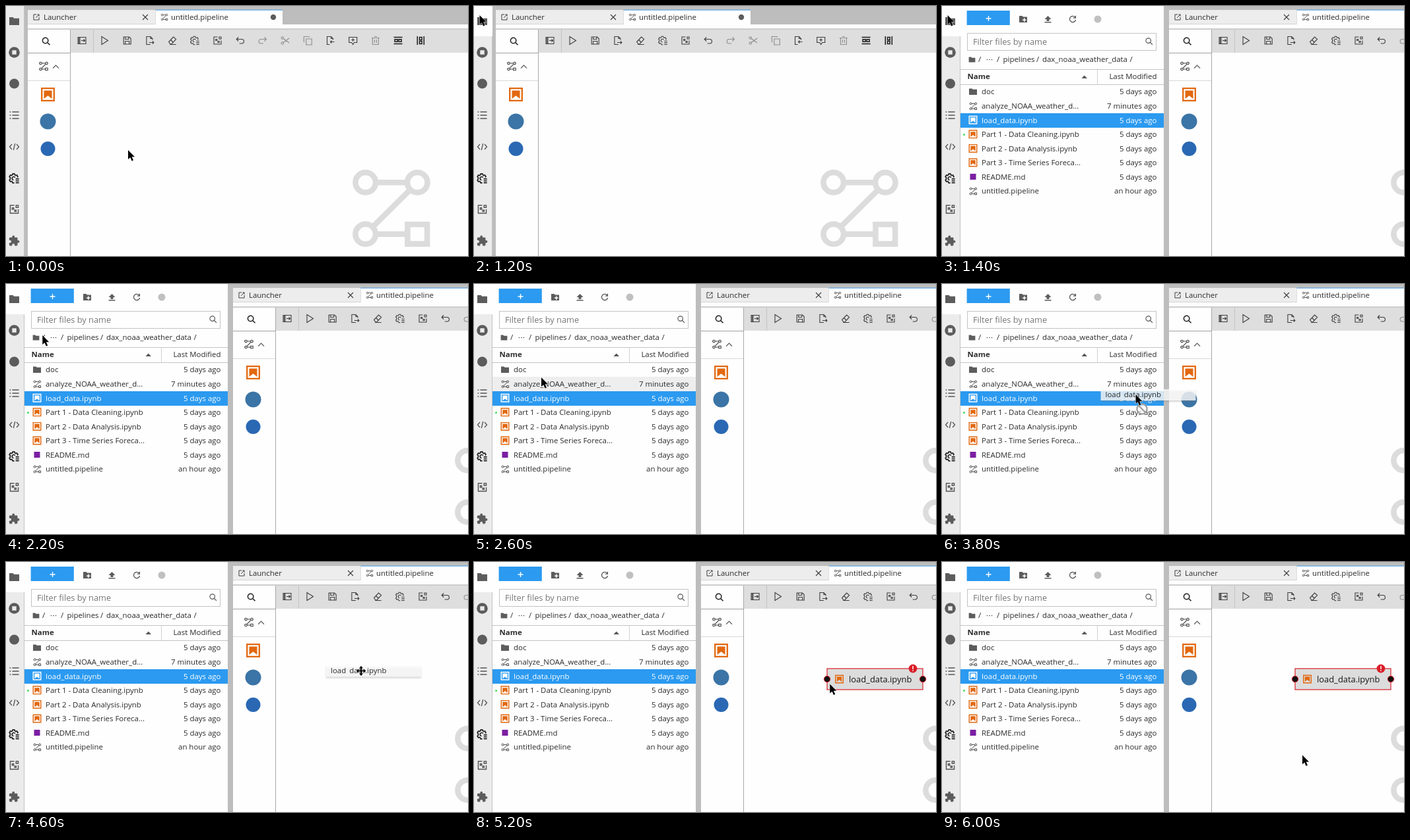
Recreate the animation shown at these times as an HTML page. Size 700 by 380 pixels, loop 6200 ms.

```html
<!DOCTYPE html>
<html lang="en">
<head>
<meta charset="utf-8">
<title>Pipeline editor drag and drop</title>
<style>
  html, body { margin: 0; width: 100%; height: 100%; overflow: hidden; background: #fff; }
  svg { display: block; width: 700px; height: 380px; }
  text { font: 11.45px "Open Sans", "Noto Sans", sans-serif; fill: #2b2b2b; }
  .end { text-anchor: end; }
  .bold { font-weight: 700; }
  .icon { fill: none; stroke: #3d3d3d; stroke-width: 1.1; }
  .dim { stroke: #8d8d8d; }
  .solid { fill: #5c5c5c; stroke: none; }
  .heavy { stroke: #1c1c1c; stroke-width: 1.5; }
  .side { stroke: #555; stroke-width: 1.3; }
  .mark { stroke: #dcdcdc; stroke-width: .98; }
  .pointer { fill: #000; stroke: #fff; stroke-width: 1; paint-order: stroke; }
</style>
</head>
<body>
<svg id="stage" viewBox="0 0 700 380"></svg>
<script>
const STEP = 200, LOOP = 6200;
const OPEN = 1400, DRAG = 3400, DROP = 5000;

const shapes = {
  panel: 'M-6-5H6V5H-6ZM-3-5V5M-4.5-5V5M-1 0H4.5M2.5-2L4.5 0 2.5 2',
  play: 'M-4.5-6V6L5 0Z',
  save: 'M-5.5-5.5H3L5.5-3V5.5H-5.5ZM-3-5.5V-2H2V-5.5M-3 5.5V1H3V5.5',
  export: 'M1 6H-5V-6H1L4-3V-1M1-6V-3H4M-1 3H6M4 1L6 3 4 5',
  eraser: 'M-5.5 2L1.5-5.5 5.5-2-1.5 5.5H-3ZM-2.5-1L1.5 3M-4 6H5.5',
  gear: 'M4-1.3L5-2.4 3.7-4.6 2-4.1.8-4.8.4-6.2H-2.2L-2.6-4.8-3.8-4.1-5.4-4.6-6.7-2.4-5.6-1.2V1.2L-6.7 2.4-5.4 4.6-3.8 4.1-2.6 4.8-2.2 6.2H0M1.2-1.2A2.3 2.3 0 1 0-1 2.3M2 .8H6.5M2 3.4H6.5M2 6H6.5',
  runtime: 'M0-5.5H-5.5V5.5H5.5V0M2.5-5.5H5.5V-2.5H2.5ZM-2.8-2H-.8V0H-2.8ZM.6 1H2.6V3H.6Z',
  undo: 'M-2.5-5L-5.5-2-2.5 1M-5.5-2H2.5A3.2 3.2 0 0 1 2.5 4.5H-1',
  redo: 'M2.5-5L5.5-2 2.5 1M5.5-2H-2.5A3.2 3.2 0 0 0-2.5 4.5H1',
  cut: 'M-6-4a1.7 1.7 0 1 0 3.4 0a1.7 1.7 0 1 0-3.4 0M-6 4a1.7 1.7 0 1 0 3.4 0a1.7 1.7 0 1 0-3.4 0M-3-3L6 3.5M-3 3L6-3.5',
  copy: 'M-2.5-2.5H6V6.5H-2.5ZM-5 2H-6V-6H2V-5',
  paste: 'M-1 6H-5V-6H1L4-3V-1M1-6V-3H4M6 2H0M2 0L0 2 2 4',
  comment: 'M-6-5H6V3H2L0 6-2 3H-6ZM-2.5-1H2.5M0-3.5V1.5',
  trash: 'M-6-4H6M-2-6H2M-4.5-4V6H4.5V-4M-1.5-1.5V3.5M1.5-1.5V3.5',
  across: 'M-6.5-5H6.5M-6.5 5H6.5M-5-1.8H-1V1.8H-5ZM1-1.8H5V1.8H1Z',
  down: 'M-5-6.5V6.5M5-6.5V6.5M-1.8-5V-1H1.8V-5ZM-1.8 1V5H1.8V1Z',
  folder: 'M-7.5-6H-2L-.3-4.2H7.5V6H-7.5Z',
  addFolder: 'M-6-5H-1.5L0-3.5H6V5H-6ZM1-1.5V.5H-1V2H1V4H2.5V2H4.5V.5H2.5V-1.5Z',
  upload: 'M0-5L-5 0H-2V3H2V0H5ZM-5 4H5V5.5H-5Z',
  refresh: 'M3.6-3A4.6 4.6 0 1 0 4.6 1M4.4-5.2V-1.8H1',
  list: 'M-7-5H-5.2M-7 0H-5.2M-7 5H-5.2M-3-5H7M-3 0H7M-3 5H7',
  code: 'M-3.5-4L-7 0-3.5 4M3.5-4L7 0 3.5 4M1.2-5L-1.2 5',
  puzzle: 'M8.5-1H7V-5a2 2 0 0 0-2-2H1V-8.5a2.5 2.5 0 0 0-5 0V-7H-8a2 2 0 0 0-2 2V-1.2H-8.5a2.7 2.7 0 0 1 0 5.4H-10V8a2 2 0 0 0 2 2H-4.2V8.5a2.7 2.7 0 0 1 5.4 0V10H5a2 2 0 0 0 2-2V4H8.5a2.5 2.5 0 0 0 0-5Z',
  search: 'M3.3-1A4.2 4.2 0 1 0-5.1-1A4.2 4.2 0 1 0 3.3-1M2.2 2L6 5.8',
  chevron: 'M-4.5 2.3L0-2.2 4.5 2.3',
  close: 'M-4-4L4 4M-4 4L4-4',
  launch: 'M0-4.5H-4.5V4.5H4.5V0M1.5-4.5H4.5V-1.5M4.5-4.5L-1 1',
  flow: 'M-2.75-4.5A1.75 1.75 0 1 0-6.25-4.5A1.75 1.75 0 1 0-2.75-4.5H2.75A1.75 1.75 0 1 0 6.25-4.5A1.75 1.75 0 1 0 2.75-4.5M3.3-3.3L-3.3 3.3M-2.75 4.5A1.75 1.75 0 1 0-6.25 4.5A1.75 1.75 0 1 0-2.75 4.5H2.8M2.8 2.8H6.2V6.2H2.8Z'
};

const icon = (name, x, y, cls = '', s = 1) =>
  `<path class="icon ${cls}" fill-rule="evenodd" transform="translate(${x} ${y}) scale(${s})" d="${shapes[name]}"/>`;
const box = (x, y, w, h, fill, more = '') =>
  `<rect x="${x}" y="${y}" width="${w}" height="${h}" fill="${fill}" ${more}/>`;
const dot = (x, y, r, fill, more = '') =>
  `<circle cx="${x}" cy="${y}" r="${r}" fill="${fill}" ${more}/>`;
const text = (x, y, str, more = '') => `<text x="${x}" y="${y}" ${more}>${str}</text>`;
const notebook = (x, y, s, color = '#e2680f') =>
  `<g transform="translate(${x} ${y}) scale(${s})">
    <path d="M-9.3-9.3H9.3V9.3H-9.3Z" fill="none" stroke="${color}" stroke-width="2.3"/>
    <path d="M-6-6H6V6.5L0 1.8-6 6.5Z" fill="${color}"/></g>`;

function sidebar() {
  return box(0, 0, 27, 380, '#ebebeb') + box(27, 0, 1, 380, '#c4c4c4') +
    `<g id="active">${box(0, 0, 28, 46, '#fefefe')}</g>` +
    icon('folder', 12.5, 23, 'solid') +
    dot(12.5, 70.5, 8.3, '#5c5c5c') + box(9.3, 67.3, 6.4, 6.4, '#ebebeb') +
    dot(12.5, 118, 7.5, '#5c5c5c') +
    icon('list', 12.5, 166, 'side') + icon('code', 12.5, 214, 'side') +
    icon('gear', 12.5, 262, 'heavy', 1.1) + icon('runtime', 12.5, 309, 'side', 1.1) +
    icon('puzzle', 12.3, 357, 'solid', .74);
}

function toolbar() {
  const names = ['play', 'save', 'export', 'eraser', 'gear', 'runtime', 'undo', 'redo',
    'cut', 'copy', 'paste', 'comment', 'trash', 'across', 'down'];
  const dim = ['redo', 'cut', 'copy', 'trash'];
  const heavy = ['across', 'down'];
  return box(98, 36, 910, 35, '#dedede') + box(132, 36, 1, 35, '#c2c2c2') +
    icon('panel', 115, 52.5) +
    names.map((n, i) => icon(n, 149.5 + i * 34.2, 52.5,
      dim.includes(n) ? 'dim' : heavy.includes(n) ? 'heavy' : '')).join('');
}

function editor() {
  return box(25, 0, 980, 380, '#bdbdbd') + box(33, 28, 980, 352, '#fefefe') +
    box(33, 6, 193, 21.5, '#ededed') + box(226.5, 6, 192.5, 23, '#fefefe') +
    box(226.5, 5.5, 192.5, 1.2, '#5aa5e6') + box(33, 34.3, 980, 1.4, '#bababa') +
    icon('launch', 46, 17, '', .9) + text(57, 21, 'Launcher') + icon('close', 211, 17) +
    icon('flow', 240, 17, '', .76) + text(250, 21, 'untitled.pipeline') + dot(405, 17, 4.2, '#5c5c5c') +
    toolbar() +
    box(97, 36, 1, 344, '#a9a9a9') + box(33, 71, 64, 1, '#a0a0a0') + box(33, 113, 64, 1, '#d8d8d8') +
    icon('search', 60.5, 53.5, 'heavy') +
    icon('flow', 57, 91.5) + icon('chevron', 75.5, 92.3, 'side') +
    notebook(63.5, 134.5, 1) + dot(63.5, 175.5, 12, '#3b74a6') + dot(63.5, 217, 11, '#2a68b4');
}

function fileRow([name, age, kind], i) {
  const y = 130.2 + i * 21.55, top = Math.round(y - 10.6), picked = kind === 'picked';
  const fill = picked ? 'style="fill:#fff"' : '';
  const mark = {
    folder: () => icon('folder', 47, y, 'solid', .8),
    flow: () => icon('flow', 47.3, y + .5, '', .85),
    note: () => notebook(47, y, .62),
    picked: () => notebook(47, y, .62, '#fff'),
    doc: () => box(42.5, y - 4.5, 9, 9, '#7b1fa2')
  }[kind]();
  const back = picked ? box(28, top, 308, 22, '#2b9af0')
    : i === 1 ? `<g id="hover">${box(28, top, 308, 22, '#eee')}</g>` : '';
  return back + mark + text(60, y + 4.2, name, fill) + text(325.5, y + 4.2, age, `class="end" ${fill}`);
}

function browser() {
  const files = [
    ['doc', '5 days ago', 'folder'],
    ['analyze_NOAA_weather_d...', '7 minutes ago', 'flow'],
    ['load_data.ipynb', '5 days ago', 'picked'],
    ['Part 1 - Data Cleaning.ipynb', '5 days ago', 'note'],
    ['Part 2 - Data Analysis.ipynb', '5 days ago', 'note'],
    ['Part 3 - Time Series Foreca...', '5 days ago', 'note'],
    ['README.md', '5 days ago', 'doc'],
    ['untitled.pipeline', 'an hour ago', 'flow']
  ];
  const crumbs = [[55, '/'], [83, '/'], [92.5, 'pipelines'], [143, '/'], [152, 'dax_noaa_weather_data'], [284.5, '/']];
  return box(28, 0, 308, 380, '#fefefe') +
    box(37.6, 7, 65.2, 22, '#2b9af0') + '<path d="M66.5 19H74.5M70.5 15V23" stroke="#fff" stroke-width="1.4"/>' +
    icon('addFolder', 123, 20, 'solid') + icon('upload', 160.5, 20, 'solid') +
    icon('refresh', 198, 20, 'side') + dot(236, 20, 5.5, '#c0c0c0') +
    box(38.5, 41.5, 286, 26, '#fefefe', 'stroke="#c4c4c4"') +
    text(47, 59, 'Filter files by name', 'style="font-size:12.8px;fill:#777"') +
    icon('search', 313.5, 53.5, 'side', .9) +
    icon('folder', 45.5, 81.5, 'solid', .65) +
    [68.5, 72, 75.5].map(x => dot(x, 81.5, .8, '#444')).join('') +
    crumbs.map(([x, s]) => text(x, 85.3, s)).join('') +
    box(28, 96, 308, 1, '#c4c4c4') + box(28, 119, 308, 1, '#c4c4c4') + box(235, 97, 1, 22, '#d4d4d4') +
    text(38.5, 111.3, 'Name', 'class="bold"') + '<path d="M211.5 110H220L215.7 105.5Z" fill="#555"/>' +
    text(325.5, 111.3, 'Last Modified', 'class="end"') +
    files.map(fileRow).join('') + dot(33.5, 195.5, 1.5, '#3ddc5a');
}

function node() {
  const port = x => dot(x, 178, 4.7, '#111', 'stroke="#da1e28" stroke-width="1"');
  return box(535, 162, 145, 32, '#dcdcdc', 'stroke="#da1e28" stroke-width="1.2"') +
    port(535) + port(680) + notebook(553.5, 178, .62) +
    text(568, 182.7, 'load_data.ipynb', 'style="font-size:12.9px;fill:#161616"') +
    dot(665, 162, 6.4, '#da1e28') +
    '<path d="M665 158V163M665 164.5V166" stroke="#fff" stroke-width="1.5"/>';
}

function pointer() {
  return `<g id="ghost">
      ${box(-53, -6, 144, 17, '#777', 'opacity=".3" filter="url(#blur)"')}
      ${box(-53, -8, 144, 17, '#fefefe', 'opacity=".78"')}
      ${text(-46, 3.6, 'load<tspan dx="5.1">data.ipynb</tspan>')}
    </g>
    <g id="deny" fill="#fff" fill-opacity=".6" stroke="#a2a2a2" stroke-width="2.4">
      <circle cx="9.5" cy="22" r="7.6"/><path d="M4.2 16.7L14.8 27.3"/></g>
    <path id="arrow" class="pointer" d="M0 0V14L3.3 11.2 5.6 16.4 8 15.4 5.7 10.3H10Z"/>
    <path id="move" class="pointer" d="M0-7.5L3-4H1V-1H4V-3L7.5 0 4 3V1H1V4H3L0 7.5-3 4H-1V1H-4V3L-7.5 0-4-3V-1H-1V-4H-3Z"/>`;
}

const stage = document.getElementById('stage');
stage.innerHTML = `<defs><filter id="blur"><feGaussianBlur stdDeviation="1.3"/></filter></defs>
  <g id="main">${editor()}</g>
  <g id="watermark">${icon('flow', 584, 307.5, 'mark', 8.73)}</g>
  <g id="node">${node()}</g>
  <g id="files">${browser()}</g>${sidebar()}
  <g id="cursor">${pointer()}</g>`;

const el = id => document.getElementById(id);
const show = (id, on) => el(id).setAttribute('visibility', on ? 'visible' : 'hidden');
const place = (id, x, y) => el(id).setAttribute('transform', `translate(${x} ${y})`);

// Pointer waypoints: time, x, y
const route = [
  [0, 185, 219], [200, 185, 219], [1000, 8.5, 14], [1800, 8.5, 14], [2600, 102, 142],
  [3000, 104, 170], [3200, 104, 173], [3800, 293.5, 168], [4600, 538, 165.5],
  [5000, 538, 165.5], [5800, 546, 293.5], [LOOP, 546, 293.5]
];
const LIFT = 3200, CROSS = 3800;

function pointerAt(t) {
  const i = route.findIndex(p => p[0] > t);
  const [t0, x0, y0] = route[i - 1], [t1, x1, y1] = route[i];
  let k = (t - t0) / (t1 - t0);
  if (t0 === LIFT) k = k ** 1.5;
  else if (t0 === CROSS) k = 1 - (1 - k) ** 1.4;
  else k = k * k * (3 - 2 * k);
  return [x0 + (x1 - x0) * k, y0 + (y1 - y0) * k];
}

function draw(now) {
  const t = Math.floor((now % LOOP) / STEP) * STEP;
  const [x, y] = pointerAt(t);
  const open = t >= OPEN, drag = t >= DRAG && t < DROP;
  const onCanvas = drag && x > 409;
  place('main', open ? 311 : 0, 0);
  place('watermark', open ? 155 : 0, 0);
  place('cursor', x, y);
  show('files', open);
  show('active', open || (x < 27 && y < 46));
  show('hover', open && !drag && x > 28 && x < 336 && y > 141 && y < 162.5);
  show('node', t >= DROP);
  show('ghost', drag);
  show('deny', drag && !onCanvas);
  show('move', onCanvas);
  show('arrow', !onCanvas);
}

const start = performance.now();
function tick() {
  draw(performance.now() - start);
  requestAnimationFrame(tick);
}
tick();
</script>
</body>
</html>
```
